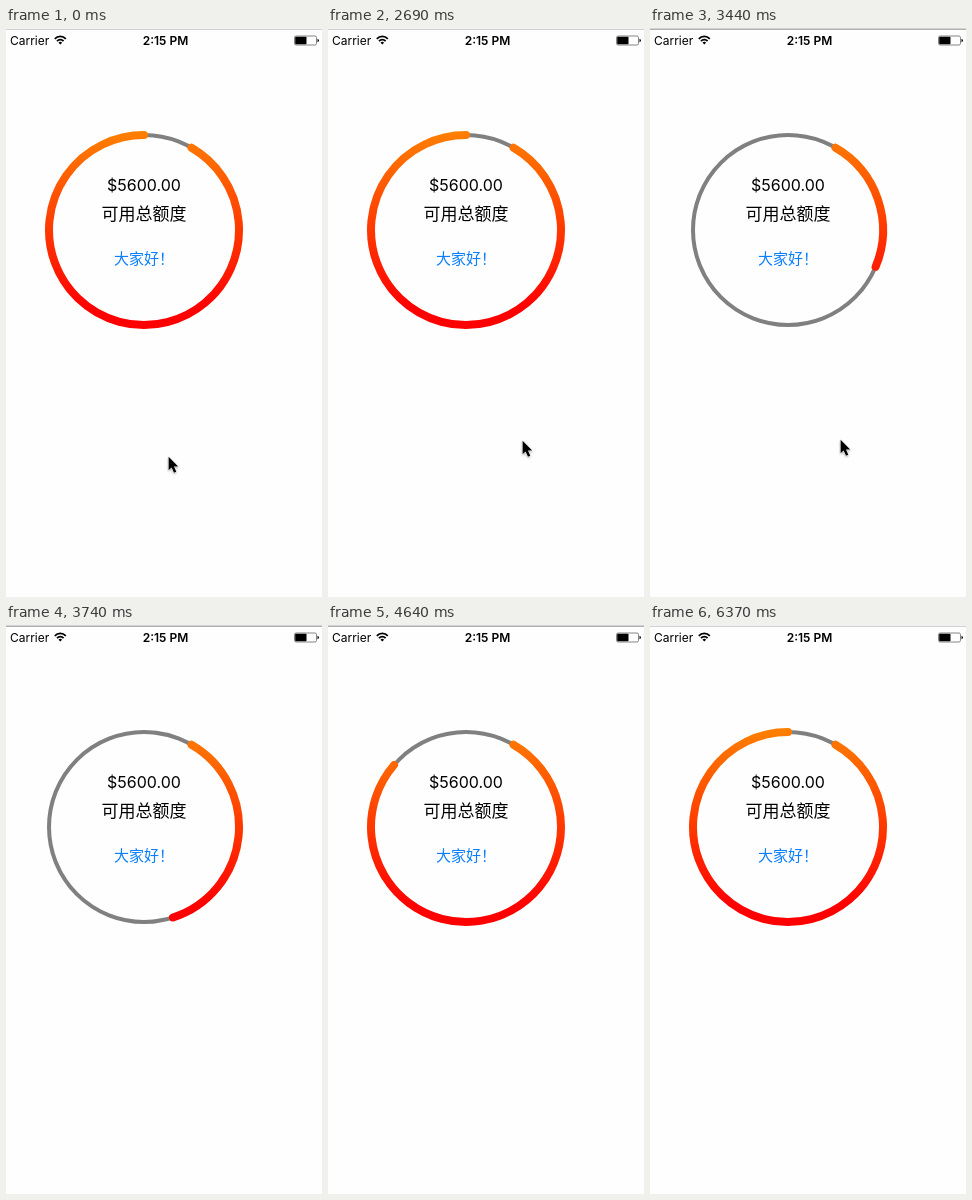
Recreate the animation shown at these times as an HTML page. Size 316 by 569 pixels, loop 6.43 s.

```html
<!DOCTYPE html>
<html lang="zh-CN">
<head>
<meta charset="utf-8">
<title>Credit ring</title>
<style>
  html, body { margin: 0; height: 100%; overflow: hidden; background: #fefefe; }
  svg { display: block; width: 316px; height: 569px; }
  text { font-family: Inter, "Noto Sans CJK SC", "Noto Sans CJK", sans-serif; }
  .status { font-size: 12px; }
  .zh { font-family: "Noto Sans CJK SC", "Noto Sans CJK", sans-serif; }
  #cursor { filter: drop-shadow(0 1px 1px rgba(0, 0, 0, .3)); }
</style>
</head>
<body>
<svg viewBox="0 0 316 569">
  <defs>
    <linearGradient id="heat" gradientUnits="userSpaceOnUse" x1="0" y1="103" x2="0" y2="280">
      <stop offset="0" stop-color="#ff8000"/>
      <stop offset="1" stop-color="#f00"/>
    </linearGradient>
  </defs>
  <rect width="316" height="569" fill="#fefefe"/>
  <rect id="titleBar" width="316" height="1"/>
  <rect id="titleEdge" y="1" width="316" height="1"/>

  <text class="status" x="4" y="16.5">Carrier</text>
  <g fill="none" stroke="#000" stroke-width="1.8">
    <path d="M48.8 10.8A7.6 7.6 0 0 1 59.8 10.8"/>
    <path d="M51 13.1A4.6 4.6 0 0 1 57.6 13.1"/>
  </g>
  <path d="M52.5 14.7A2.6 2.6 0 0 1 56.1 14.7L54.3 16.6Z"/>
  <text class="status" x="159.5" y="16.5" text-anchor="middle" font-weight="600">2:15 PM</text>
  <rect x="288.5" y="8" width="22" height="9" rx="1.6" fill="none" stroke="#777" stroke-width=".9"/>
  <rect x="289.2" y="8.8" width="11.3" height="7.4" rx=".8"/>
  <path d="M311.5 10.8Q313 11.3 313 12.5T311.5 14.2Z"/>

  <circle cx="138" cy="202" r="95" fill="none" stroke="#808080" stroke-width="4"/>
  <path id="arc" fill="none" stroke="url(#heat)" stroke-width="8" stroke-linecap="round"/>

  <g text-anchor="middle">
    <text x="138" y="163" font-size="16">$5600.00</text>
    <text class="zh" x="138" y="192" font-size="17">可用总额度</text>
    <text class="zh" x="138" y="235.7" font-size="15" fill="#0a7fff">大家好！</text>
  </g>
  <path id="cursor" d="M1.6 .8V14.2L4.6 11.4L7 16.7L9.3 15.7L7 10.6H11.2Z" stroke="#fff" stroke-width="1" paint-order="stroke"/>
</svg>
<script>
const LOOP = 6430, STEP = 150, RUN_START = 2990, RUN_END = 6370;
const START_ANGLE = -60, FIRST_ANGLE = -51.5, END_ANGLE = 270, STEP_ANGLE = 24.75;

// [from ms, x, y]; no position means hidden
const cursorStops = [
  [0, 161, 428], [150], [2690, 193, 412], [2840, 172, 385],
  [2990, 172, 384], [3440, 189, 411], [3590, 256, 548], [3740]
];

const byId = id => document.getElementById(id);

function pointAt(degrees) {
  const a = degrees * Math.PI / 180;
  return `${138 + 95 * Math.cos(a)} ${202 + 95 * Math.sin(a)}`;
}

function drawArc(end) {
  const large = end - START_ANGLE > 180 ? 1 : 0;
  byId('arc').setAttribute('d', `M${pointAt(START_ANGLE)}A95 95 0 ${large} 1 ${pointAt(end)}`);
}

function render(t) {
  const steps = Math.floor((t - RUN_START) / STEP);
  drawArc(steps < 0 ? END_ANGLE : Math.min(END_ANGLE, FIRST_ANGLE + steps * STEP_ANGLE));

  const active = t >= RUN_START && t < RUN_END;
  byId('titleBar').setAttribute('fill', active ? '#d2d2d2' : '#f2f2f2');
  byId('titleEdge').setAttribute('fill', active ? '#b0b0b0' : '#d1d1d1');

  const [, x, y] = cursorStops.filter(stop => stop[0] <= t).pop();
  const cursor = byId('cursor');
  cursor.style.display = x === undefined ? 'none' : '';
  if (x !== undefined) cursor.setAttribute('transform', `translate(${x} ${y})`);
}

const began = performance.now();
function tick() {
  render((performance.now() - began) % LOOP);
  requestAnimationFrame(tick);
}
tick();
</script>
</body>
</html>
```
